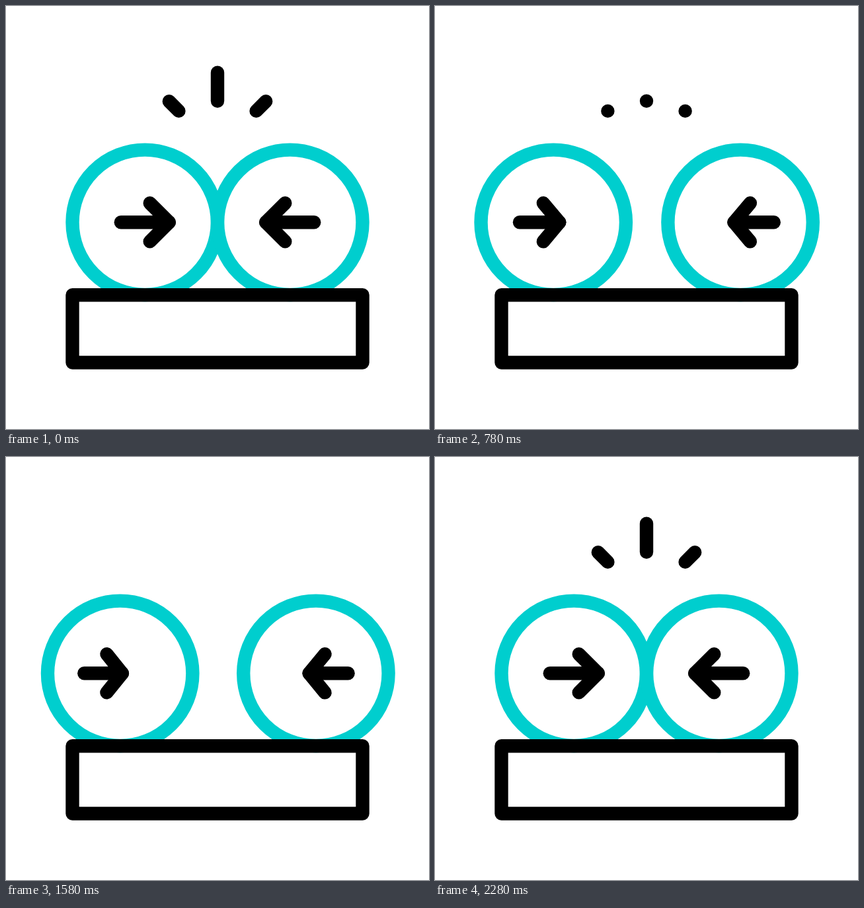
An HTML page with a canvas that plays this animation: 640 px wide and 640 px high, repeating every 3600 ms.

```html
<!DOCTYPE html>
<html lang="en">
<head>
<meta charset="utf-8">
<title>Collision</title>
<style>
  html, body { margin: 0; width: 100%; height: 100%; overflow: hidden; background: #fff; }
  canvas { display: block; width: 640px; height: 640px; }
</style>
</head>
<body>
<canvas id="stage" width="640" height="640"></canvas>
<script>
const ctx = document.getElementById('stage').getContext('2d');
const LOOP = 3600, STEP = 20, SIZE = 640, MID = 327.3;
const TEAL = '#00cece', BLACK = '#000';

const clamp = v => Math.min(1, Math.max(0, v));
const span = (t, a, b) => clamp((t - a) / (b - a));
const smooth = u => u * u * (3 - 2 * u);
const mix = (a, b, u) => a + (b - a) * u;

// Cubic bezier easing with flat ends; x1 and x2 are the handle lengths.
function ease(u, x1, x2) {
  let lo = 0, hi = 1;
  for (let i = 0; i < 24; i++) {
    const s = (lo + hi) / 2, r = 1 - s;
    if (3 * r * r * s * x1 + 3 * r * s * s * x2 + s * s * s < u) lo = s;
    else hi = s;
  }
  return smooth(lo);
}

// 0 = touching, 1 = fully apart; rebounds once after the hit.
function gap(t, hit) {
  if (t < 1440) return ease(span(t, 400, 1440), 0.33, 0.25);
  if (t < hit) return 1 - smooth(span(t, 1440, hit));
  if (t < 2040) return 0.11 * smooth(span(t, hit, 2040));
  return 0.11 * (1 - smooth(span(t, 2040, 2280)));
}

function sparkLength(t) {
  if (t < 800) return 1 - smooth(span(t, 590, 780));
  if (t < 2080) return 1.8 * smooth(span(t, 1740, 2080));
  return mix(1.8, 1, smooth(span(t, 2080, 2280)));
}

function line(...points) {
  ctx.beginPath();
  points.forEach(([x, y], i) => i ? ctx.lineTo(x, y) : ctx.moveTo(x, y));
  ctx.stroke();
}

function ring(x) {
  ctx.strokeStyle = TEAL;
  ctx.beginPath();
  ctx.arc(x, MID, 109.7, 0, Math.PI * 2);
  ctx.stroke();
}

// The shaft shortens as the arrow travels; side mirrors it.
function arrow(p, side, extra) {
  const at = (x, move) => {
    const left = x - (move + extra) * p;
    return side < 0 ? left : SIZE - left;
  };
  const tail = at(173.8, 83.6), tip = at(246.8, 106.8), barb = at(217.7, 98.3);
  ctx.strokeStyle = BLACK;
  line([tail, MID], [tip, MID]);
  line([barb, 298.2], [tip, MID], [barb, 356.4]);
}

function spark(x, y, dx, dy, len) {
  line([x, y], [x + dx * len, y + dy * len + 0.01]);
}

function draw(t) {
  ctx.fillStyle = '#fff';
  ctx.fillRect(0, 0, SIZE, SIZE);
  ctx.lineWidth = 20.4;
  ctx.lineCap = ctx.lineJoin = 'round';

  const p = gap(t, 1800);
  ring(210.2 - 56.5 * p);
  ring(429.8 + 58.9 * p);
  arrow(p, -1, 0);
  arrow(gap(t, 1766), 1, 1.3);

  ctx.strokeStyle = BLACK;
  ctx.strokeRect(100.5, 437.2, 439, 102.3);

  if (t < 800 || t >= 1740) {
    const len = sparkLength(t);
    spark(320, 143.8, 0, -43, len);
    spark(261.4, 158.9, -14.6, -14.6, len);
    spark(378.6, 158.9, 14.6, -14.6, len);
  }
}

const start = performance.now();
function tick() {
  const t = (performance.now() - start) % LOOP;
  draw(Math.floor(t / STEP) * STEP);
  requestAnimationFrame(tick);
}
tick();
</script>
</body>
</html>
```
